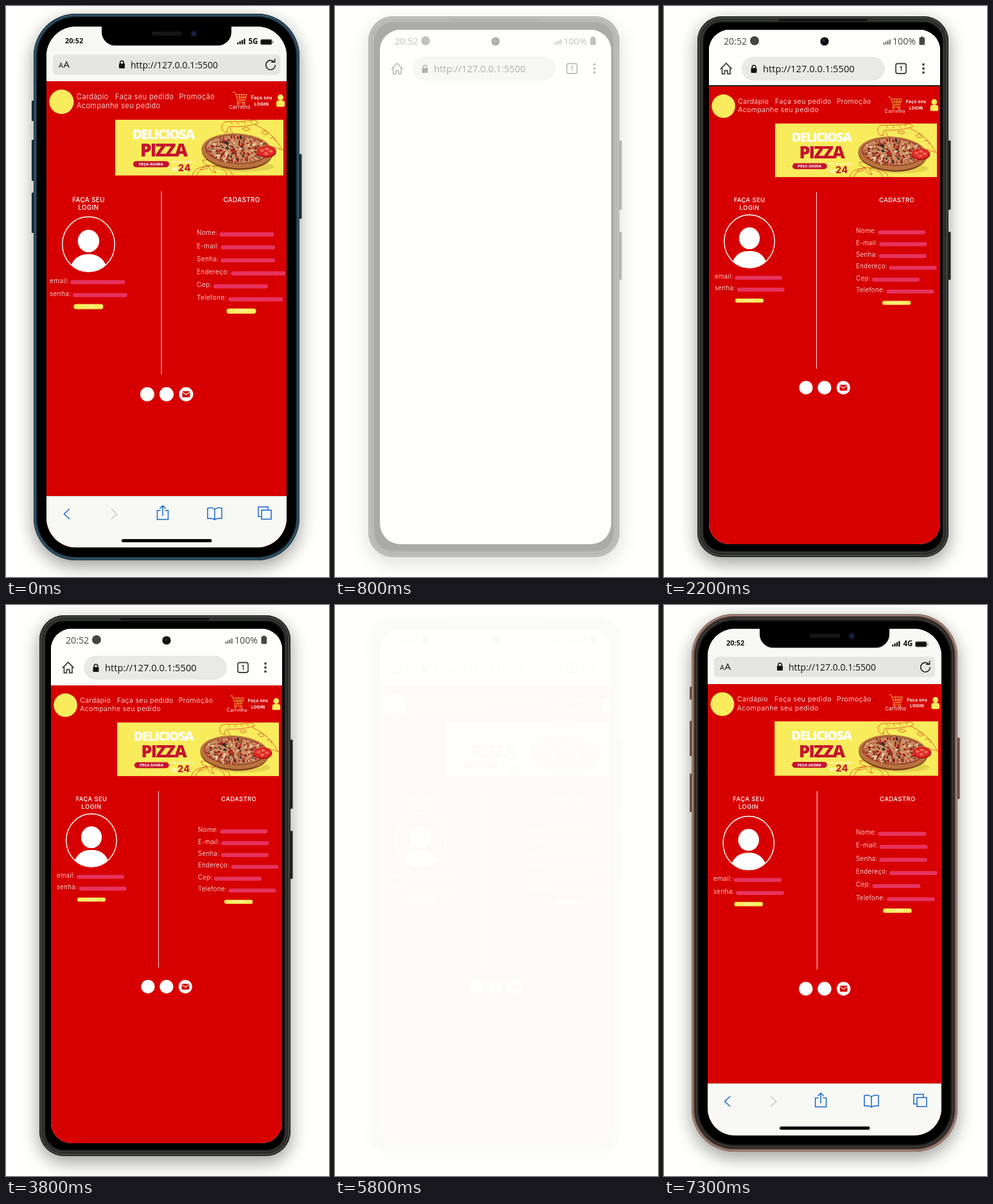
Write an HTML page with a canvas that moves like this. It is 503x888 px and loops after 8 s.

```html
<!DOCTYPE html>
<html lang="pt">
<head>
<meta charset="utf-8">
<style>
  html, body { margin: 0; height: 100%; overflow: hidden; background: #fffffc; }
  canvas { display: block; }
</style>
</head>
<body>
<canvas id="stage" width="503" height="888"></canvas>
<script>
const g = document.getElementById('stage').getContext('2d');
const PAPER = '#fffffc', RED = '#d60000', YELLOW = '#f8ec5c', PINK = '#e6335f', BLUE = '#1668c9';
const ZOOM = 2.3;

// Page measures are in units of a page 374 wide.
const blue = {
  start: -5000, fade: 450, x: 63, y: 32, w: 374, h: 810, r: 46, top: 117, bar: 762, net: '5G',
  frame: [43, 12, 414, 850, 66], layers: [[0, '#1b3342'], [1.5, '#4b7084'], [2.5, '#213f50'], [5, '#000']],
  buttons: [[40, 147, 32], [40, 208, 64], [40, 290, 63], [457, 230, 101]],
  row: 20.2, first: 236, face: 253.5, loginX: 5, formX: 234, field: 85, button: 8, rule: 179
};
const android = {
  start: 800, fade: 5480, x: 70, y: 37, w: 360, h: 800, r: 32, top: 125,
  frame: [52, 16, 391, 841, 38],
  layers: [[0, '#252725'], [2, '#5c5e5a'], [3, '#2b2d2b'], [7, '#434542'], [8, '#151615'], [10, '#000']],
  buttons: [[443, 209, 108], [443, 351, 75]],
  row: 19.1, first: 233.7, face: 250.4, loginX: 9.3, formX: 238, field: 77, button: 6.5, rule: 174
};
const gold = {
  start: 6000, fade: 1e6, x: 68, y: 37, w: 364, h: 788, r: 42, top: 123, bar: 744, net: '4G',
  frame: [43, 14, 414, 836, 66],
  layers: [[0, '#7d6156'], [1.2, '#c4a091'], [2.4, '#6b5248'], [4.5, '#2a2725'], [7, '#45413e'], [8.5, '#1c1c1b'], [11, '#000']],
  buttons: [[40, 127, 20], [40, 180, 55], [40, 262, 60], [457, 206, 96]],
  row: 20.9, first: 237, face: 254, loginX: 9.2, formX: 237.4, field: 77, button: 7, rule: 175
};

function box(x, y, w, h, r, fill) {
  g.beginPath();
  g.roundRect(x, y, w, h, r);
  g.fillStyle = fill;
  g.fill();
}
function oval(x, y, rx, ry, fill, turn = 0) {
  g.beginPath();
  g.ellipse(x, y, rx, ry, turn, 0, 7);
  g.fillStyle = fill;
  g.fill();
}
function line(d, color, width = 1) {
  g.strokeStyle = color;
  g.lineWidth = width;
  g.stroke(new Path2D(d));
}
function at(x, y, scale, draw) {
  g.save();
  g.translate(x, y);
  g.scale(scale, scale);
  draw();
  g.restore();
}
function text(s, x, y, size, { color = '#fff', weight = 400, align = 'left', family = 'Inter', space = 0.04 } = {}) {
  g.font = `${weight} ${size}px "${family}", sans-serif`;
  g.letterSpacing = space * size + 'px';
  g.textAlign = align;
  g.fillStyle = color;
  g.fillText(s, x, y);
  return g.measureText(s).width;
}
const system = (s, x, y, size, style) => text(s, x, y, size, { family: 'Open Sans', space: 0, color: '#111', ...style });

// Piecewise linear value over [time, value] points.
function track(points, t) {
  const i = points.findIndex(p => p[0] > t);
  if (i < 0) return points.at(-1)[1];
  if (!i) return points[0][1];
  const [a, u] = points[i - 1], [b, v] = points[i];
  return u + (v - u) * (t - a) / (b - a);
}

// ---- web page ----
const logo = () => oval(23.5, 32, 19, 19, YELLOW);

const nav = (s, x, y) => text(s, x, y, 11, { weight: 300 });

function account() {
  line('M290 17h3.5l4.5 13h11l3-9.5h-17M296 25h15M300 20.5l1.5 9.5M304 20.5v9.5M308 20.5l-1.5 9.5M298 30l-1 3h13', YELLOW, .7);
  for (const x of [298.5, 307]) line(`M${x - 1.6} 35.3a1.6 1.6 0 1 0 3.2 0a1.6 1.6 0 1 0-3.2 0`, YELLOW, .7);
  text('Carrinho', 301, 42.5, 7.6, { align: 'center' });
  text('Faça seu', 335, 27.5, 7, { weight: 700, align: 'center' });
  text('LOGIN', 335, 37.5, 6.8, { weight: 700, align: 'center' });
  oval(364.5, 25.3, 4.5, 4.8, YELLOW);
  box(358, 30, 13, 9.8, [4, 4, 2, 2], YELLOW);
}

function banner() {
  const ink = '#c51230', title = { family: 'Open Sans', weight: 800, space: -.07 };
  g.beginPath();
  g.rect(0, 0, 262, 87);
  g.clip();
  box(0, 0, 262, 87, 0, YELLOW);
  text('DELICIOSA', 27, 30, 20.5, title);
  text('PIZZA', 39, 57, 28, { ...title, color: ink });
  box(28, 64.5, 56, 9.5, 4.7, ink);
  text('PEÇA AGORA', 56, 71.5, 5.4, { weight: 800, align: 'center' });
  text('EM OFERTAS', 87, 67.5, 4, { weight: 800, space: .3 });
  text('R$', 89, 79.5, 6, { weight: 800, space: 0 });
  text('24', 98, 80.5, 14.5, { weight: 800, color: ink, space: .04 });

  // sketched slice and tomato
  line('M166 10q2-7 9-7q20 1 41-2q8 1 6 5q-20 6-45 5q-4 3-2 9q-10 0-9-10zM179 12q-1 8 14 14l70 22M218 8q26 10 42 38M198 14q6-4 12 1q-6 5-12-1M228 19q7-5 10 3q-6 4-10-3M241 29q8-4 9 5M180 4l3 4M190 4l3 4M200 3l3 4M210 2l3 4', RED, .6);
  line('M120 87q4-13 20-14q10-3 24 1q18 3 19 13M136 63q2 8 10 8q-9 2-14 7q10 0 14-5q2 8 11 10q-5-8-4-11q9 1 16-4q-10 0-16 1q-1-8-17-6M127 87q2-6 6-8M166 77q7 3 8 10', RED, .6);

  // pizza
  oval(200, 73, 48, 8, '#b89d3255');
  oval(190, 50, 55.5, 28, '#7c3f1c', .06);
  oval(190, 48.5, 55.5, 27, '#b9733f', .06);
  oval(190, 46.5, 50, 22.5, '#96432a', .06);
  oval(190, 46, 48, 21, '#c98d62', .06);
  const rand = n => Math.abs(Math.sin(n * 78.233) * 43758.5453) % 1;
  const toppings = ['#a51d1d', '#e6cfa6', '#8a2a1c', '#cf9a68', '#bb2a23', '#3a2a22', '#9c4a2c'];
  for (let i = 1; i < 300; i++) {
    const a = rand(i) * 6.283, r = Math.sqrt(rand(i + 400)), size = .7 + 1.6 * rand(i + 800);
    oval(190 + Math.cos(a) * r * 48, 46 + Math.sin(a) * r * 20.5, size * 1.3, size * .8, toppings[i % 7], a);
  }
  oval(235.8, 50, 15, 9.4, '#a80c12');
  oval(235.3, 49.3, 14, 8.3, '#e02a24');
  for (const [x, y] of [[229, 48], [236, 45.5], [242, 49], [235, 52.5]]) oval(x, y, 3, 2, '#f0705c');
}

function heading(s, x, y) {
  text(s, x, y, 9.8, { weight: 500, align: 'center' });
}

function face(y) {
  g.beginPath();
  g.ellipse(65.5, y, 40.8, 42.8, 0, 0, 7);
  g.strokeStyle = '#fff';
  g.lineWidth = 1.5;
  g.stroke();
  g.save();
  g.clip();
  oval(65.5, y - 5, 16.7, 17.5, '#fff');
  box(37, y + 15.5, 57, 50, [26, 26, 0, 0], '#fff');
  g.restore();
}

function field(label, x, y, width) {
  const end = x + text(label, x, y + 3.3, 10, { weight: 300 });
  box(end + 2.5, y - 1, width, 6.4, 3.2, PINK);
}
function button(label, x, y, height) {
  box(x - 23, y - height / 2, 46, height, height / 2, YELLOW);
  text(label, x, y + 1.8, 5, { align: 'center', color: '#fffbc0', weight: 500 });
}

function login(faceY) {
  heading('FAÇA SEU', 65.5, 187.5);
  heading('LOGIN', 65.5, 199.8);
  face(faceY);
}

function forms(d) {
  const email = d.face + 56.7, senha = email + d.row;
  field('email:', d.loginX, email, d.field);
  field('senha:', d.loginX, senha, d.field);
  button('LOGIN', 65.5, senha + 20, d.button);
  heading('CADASTRO', 304, 187.5);
  const labels = ['Nome:', 'E-mail:', 'Senha:', 'Endereço:', 'Cep:', 'Telefone:'];
  labels.forEach((s, i) => field(s, d.formX, d.first + i * d.row, d.field));
  button('SALVAR', 303.5, d.first + 5 * d.row + 20.6, d.button);
}

function contacts() {
  for (const x of [157, 187, 217.5]) oval(x, 486.8, 11, 11, '#fff');
  box(211.5, 482, 12, 9.6, 1.5, RED);
  line('M212 483.5l5.5 4l5.5-4', '#fff', 1.1);
}

function fittedPage(d) {
  at(d.x, d.top, d.w / 374, () => {
    logo();
    nav('Cardápio', 47, 28);
    nav('Faça seu pedido', 107, 28);
    nav('Promoção', 206.5, 28);
    nav('Acompanhe seu pedido', 47, 42);
    account();
    at(107, 59.7, 1, banner);
    login(d.face);
    forms(d);
    box(d.rule - .5, 171, 1.1, 285, 0, '#ffd9d9');
    contacts();
  });
}

function zoomedPage(d) {
  at(d.x - 70, d.top - 125, 1, () => {
    at(24, 153, ZOOM, logo);
    at(0, 0, ZOOM, () => {
      const lines = ['Cardápio', 'Faça seu', 'pedido', 'Promoção', 'Acompanhe', 'seu pedido'];
      lines.forEach((s, i) => nav(s, (i % 3 == 2 ? 123 : 133) / ZOOM, (157 + 30 * i) / ZOOM));
    });
    at(-364, 150, ZOOM, account);
    at(-186, 318, ZOOM, banner);
    at(69, 178.5, ZOOM, () => login(253));
  });
}

// ---- phones ----
function padlock(x, y) {
  box(x - 4.5, y - 1.5, 9, 7.5, 1, '#111');
  line(`M${x - 2.8} ${y - 1}v-2a2.8 2.8 0 0 1 5.6 0v2`, '#111', 1.5);
}
function signal(x, y, color) {
  [3, 5, 6.5, 8.5].forEach((h, i) => box(x + i * 3.4, y - h, 2.3, h, .5, color));
}

function iosChrome(d, t) {
  const { x, y, w, bar } = d, right = x + w;
  box(x, y, w, d.top - y, 0, '#f8f8f5');
  box(149, y - 4, 202, 33.5, [0, 0, 21, 21], '#000');
  box(227, y + 7.5, 47, 6.5, 3.2, '#151517');
  oval(292.5, y + 11, 5.5, 5.5, '#0d1220');
  oval(292.5, y + 11, 2.5, 2.5, '#1c2b4c');
  system('20:52', x + 29, y + 26, 11, { weight: 700 });
  signal(right - 77, y + 27.5, '#111');
  system(d.net, right - 59.5, y + 27, 11.5, { weight: 700 });
  box(right - 41, y + 19.5, 18.5, 9, 2.5, '#777');
  box(right - 40, y + 20.5, 16.5, 7, 1.5, '#111');
  box(right - 21.8, y + 22.5, 1.5, 3, 1, '#777');

  box(x + 10, y + 43.5, w - 20, 31.5, 6, '#e5e6e3');
  system('A', x + 19, y + 64, 11);
  system('A', x + 26.5, y + 64, 15);
  padlock(180.5, y + 59);
  system('http://127.0.0.1:5500', 262, y + 64.5, 14, { align: 'center' });
  const cx = right - 25, cy = y + 59.5;
  line(`M${cx + 5.5} ${cy - 4.5}a7.3 7.3 0 1 0 1.8 4.8M${cx + 1} ${cy - 4.2}h5.6v-5.6`, '#111', 1.4);
  if (t >= 6300 && t < 7300) {
    const end = track([[6300, 100], [6800, 411], [7000, 420]], t);
    box(x + 12, y + 73, end - x - 12, 2, 1, BLUE);
  }

  box(x, bar, w, 100, 0, '#f8f8f5');
  box(x, bar, w, .7, 0, '#c9c9c6');
  const icons = [
    [-155, 'M4-8l-8.5 8l8.5 8', BLUE],
    [-82, 'M-4-8l8.5 8l-8.5 8', '#c6c7c6'],
    [-6, 'M-3.5-5.5h-5v14h17v-14h-5M0 3v-16M-4.5-8.5l4.5-4.5l4.5 4.5', BLUE],
    [75, 'M0-7q-4-4-11-2v16q7-1 11 2q4-3 11-2v-16q-7-2-11 2v16', BLUE],
    [153, 'M-5-6h15v14h-15zM-6 4h-4v-15h15v4', BLUE]
  ];
  for (const [dx, glyph, color] of icons) at(250 + dx * w / 374, bar + 28, 1, () => line(glyph, color, 1.5));
  box(180, bar + 67, 140.5, 5, 2.5, '#000');
}

function androidChrome(d, t) {
  const grey = '#454644';
  box(70, 37, 360, 88, 0, '#fefefb');
  system('20:52', 93, 60, 14.2, { color: grey });
  oval(141, 54, 7, 7, grey);
  oval(250, 55, 6.6, 6.6, '#0b0c0e');
  oval(249, 54, 2, 2, '#26313d');
  at(341, 60, .95, () => signal(0, 0, '#777875'));
  system('100%', 356, 60, 14.2, { color: grey });
  box(397.5, 49, 8.5, 11.5, 1, grey);
  box(400, 47.5, 3.5, 2, 0, grey);
  line('M88 98l8.8-9l8.8 9M90.5 96v9.5h4v-5h4.5v5h4v-9.5', grey, 1.8);
  box(121, 79, 223, 37, 18.5, '#e9eae6');
  padlock(140, 98);
  system('http://127.0.0.1:5500', 154, 102.5, 14.7);
  g.beginPath();
  g.roundRect(361, 89.5, 16, 15.5, 3);
  g.strokeStyle = grey;
  g.lineWidth = 1.8;
  g.stroke();
  system('1', 369, 101, 10, { weight: 700, align: 'center', color: grey });
  for (const y of [91, 97.2, 103.4]) oval(404, y, 1.9, 1.9, grey);
  if (t >= 1100 && t < 2500) {
    const end = track([[1100, 82], [1300, 298], [2200, 431]], t);
    box(70, 123, end - 70, 2, 0, '#222');
  }
}

function phone(d, t) {
  const [x, y, w, h, r] = d.frame;
  for (const [bx, by, bh] of d.buttons) box(bx, by, 3.5, bh, 1.5, d.layers[0][1]);
  g.save();
  g.shadowColor = '#0006';
  g.shadowBlur = 28;
  g.shadowOffsetY = 9;
  box(x, y, w, h, r, d.layers[0][1]);
  g.restore();
  for (const [inset, color] of d.layers) box(x + inset, y + inset, w - 2 * inset, h - 2 * inset, r - inset, color);
  if (d == android) box(178, 20, 139, 3.5, 1.7, '#111');

  g.save();
  g.beginPath();
  g.roundRect(d.x, d.y, d.w, d.h, d.r);
  g.clip();
  box(d.x, d.y, d.w, d.h, 0, '#fefefb');
  const age = t - d.start;
  if (age >= 300) {
    box(d.x, d.top, d.w, d.h, 0, RED);
    (age < 500 ? zoomedPage : fittedPage)(d);
  }
  (d == android ? androidChrome : iosChrome)(d, t);
  g.restore();
}

function render(t) {
  const d = t < 800 ? blue : t < 6000 ? android : gold;
  const opacity = Math.max(.02, Math.min(1, (t - d.start + 100) / 300, 1 - (t - d.fade) / 270));
  box(0, 0, 503, 888, 0, PAPER);
  phone(d, t);
  g.globalAlpha = 1 - opacity;
  box(0, 0, 503, 888, 0, PAPER);
  g.globalAlpha = 1;
}

function tick() {
  render(Math.floor(performance.now() % 8000 / 100) * 100);
  requestAnimationFrame(tick);
}
tick();
</script>
</body>
</html>
```
